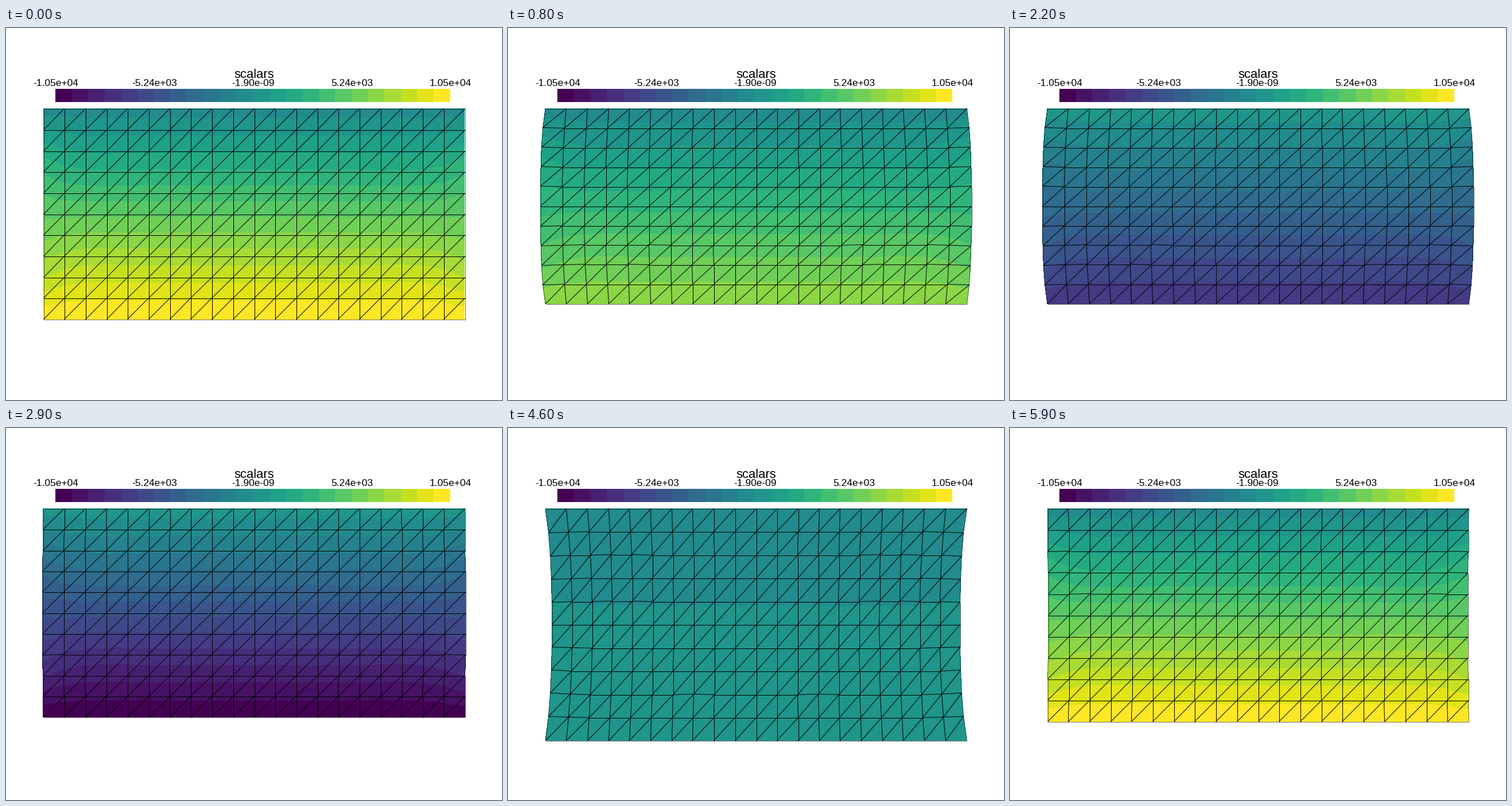
A matplotlib script for the animation above (6 s loop, 864 by 648 pixels).

```python
import numpy as np
import matplotlib.pyplot as plt
from matplotlib.animation import FuncAnimation
from matplotlib.collections import LineCollection
from matplotlib.patches import Rectangle

W, H, DPI = 864, 648, 100
FRAMES, INTERVAL = 60, 100
COLS, ROWS, CELL = 20, 10, 36.7
LEFT, TOP = 65.0, 140.65
STROKE = 0.1 * ROWS * CELL      # amplitude of the moving bottom edge
PEAK, DRAG, BANDS = 10480, 480, 24

px = 72 / DPI
colors = plt.get_cmap("viridis")(np.linspace(0, 1, BANDS))
levels = np.linspace(-PEAK, PEAK, BANDS + 1)

fig = plt.figure(figsize=(W / DPI, H / DPI), dpi=DPI, facecolor="white")
ax = fig.add_axes([0, 0, 1, 1])
ax.set_xlim(0, W)
ax.set_ylim(H, 0)
ax.axis("off")


def label(x, y, text, size):
    ax.text(x, y, text, size=size * px, family="Liberation Sans",
            ha="center", va="baseline", color="black")


# Scalar bar
BAR_X, BAR_Y, BAR_W, BAR_H = 86, 106, 688, 23
for i, color in enumerate(colors):
    ax.add_patch(Rectangle((BAR_X + i * BAR_W / BANDS, BAR_Y), BAR_W / BANDS,
                           BAR_H, facecolor=color, edgecolor="none", lw=0))
label(432, 87, "scalars", 22)
ticks = ["-1.05e+04", "-5.24e+03", "-1.90e-09", "5.24e+03", "1.05e+04"]
for i, tick in enumerate(ticks):
    label(BAR_X + 0.5 + i * BAR_W / 4, 101.3, tick, 17.4)

# Mesh topology: every cell is split from bottom left to top right
index = np.arange((ROWS + 1) * (COLS + 1)).reshape(ROWS + 1, COLS + 1)
tl, tr = index[:-1, :-1].ravel(), index[:-1, 1:].ravel()
bl, br = index[1:, :-1].ravel(), index[1:, 1:].ravel()
triangles = np.vstack([np.c_[tl, tr, bl], np.c_[tr, br, bl]])


def pairs(a, b):
    return np.c_[a.ravel(), b.ravel()]


inner = np.vstack([
    pairs(index[1:-1, :-1], index[1:-1, 1:]),
    pairs(index[:-1, 1:-1], index[1:, 1:-1]),
    np.c_[bl, tr],
])
border = np.vstack([
    pairs(index[[0, -1], :-1], index[[0, -1], 1:]),
    pairs(index[:-1, [0, -1]], index[1:, [0, -1]]),
])

# Rest shape and the two deformation modes
col, row = np.meshgrid(np.arange(COLS + 1), np.arange(ROWS + 1))
depth = (row / ROWS).ravel()
side = (col / (COLS / 2) - 1).ravel()
edge = (1 - np.abs(side)) * COLS / 2 * CELL     # distance to the free side
rest_x = LEFT + col.ravel() * CELL

fade = np.exp(-edge / 45) * np.cos(edge / 45)
wave = np.sin(2 * np.pi * depth)
stretch = (depth + (0.06 * fade - 0.012) * wave
           + 0.0065 * np.sin(np.pi * depth))
power = 2 + 1.1 * np.exp(-edge / 30)
bulge = (0.31 * np.sign(side) * np.abs(side) ** 1.45
         * (1 - np.abs(2 * depth - 1) ** power))


def add_lines(points, edges, alpha):
    ax.add_collection(LineCollection(points[edges], colors="black", alpha=alpha,
                                     linewidths=px, zorder=3), autolim=False)


def draw(frame):
    for item in list(ax.collections):
        item.remove()
    angle = 2 * np.pi * frame / FRAMES
    shift = -STROKE * np.sin(angle)
    rate = round(np.cos(angle), 9)

    x = rest_x - shift * bulge
    y = TOP + depth * ROWS * CELL + shift * stretch
    value = rate * (PEAK + DRAG) * stretch - DRAG * np.sign(rate)
    value = np.clip(value + 1, -PEAK + 1, PEAK - 1)

    ax.tricontourf(x, y, triangles, value, levels=levels, colors=colors)
    # Lines run between pixel centres to stay crisp
    centres = np.floor(np.c_[x, y] + 1e-6) + 0.5
    add_lines(centres, border, 0.55)
    add_lines(centres, inner, 1)
    ax.set_xlim(0, W)
    ax.set_ylim(H, 0)
    return ax.collections


anim = FuncAnimation(fig, draw, frames=FRAMES, interval=INTERVAL,
                     repeat=True, repeat_delay=0, blit=False)
plt.show()
```
